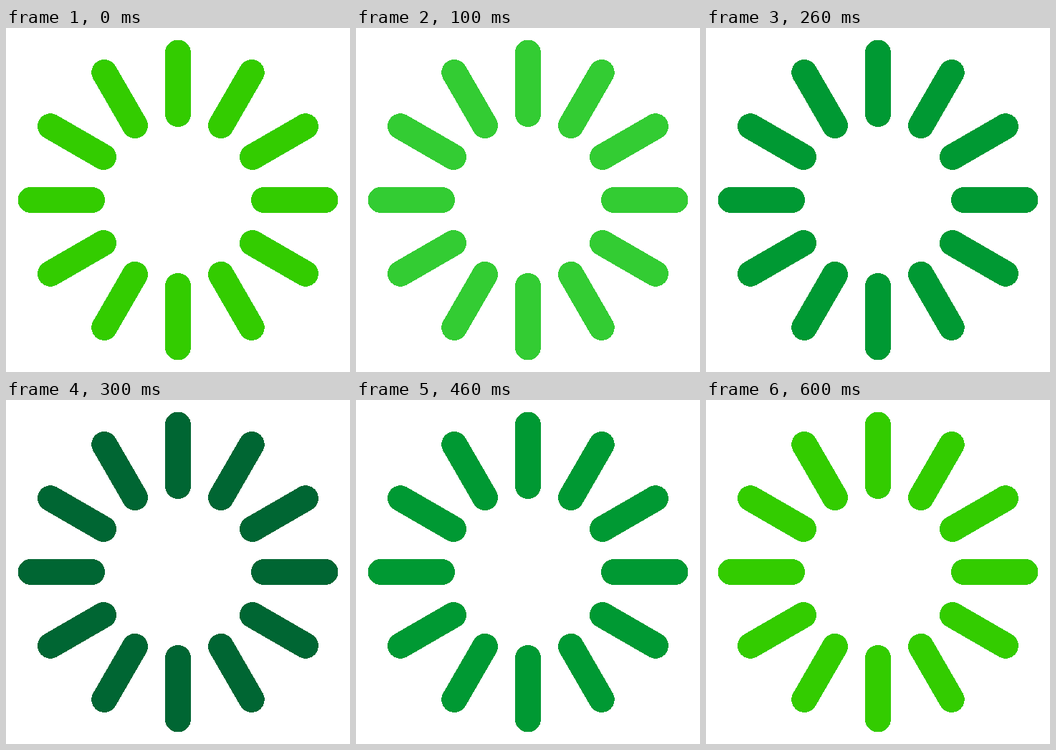
Write an HTML page that moves like this. It is 480 px wide and 480 px high and loops after 0.7 s.

```html
<!DOCTYPE html>
<html lang="en">
<head>
<meta charset="utf-8">
<title>Pulsing spinner</title>
<style>
  html, body { margin: 0; width: 100%; height: 100%; overflow: hidden; background: #fff; }
  svg { display: block; width: 100%; height: 100%; }
</style>
</head>
<body>
<svg viewBox="0 0 480 480">
  <g id="spokes" transform="translate(240 240)" stroke="#33cc00" stroke-width="36"
     stroke-linecap="round" shape-rendering="crispEdges"></g>
</svg>
<script>
  const SPOKES = 12, INNER = 120, OUTER = 205.5;
  const STEP = 100;
  const COLORS = ['#33cc00', '#33cc33', '#009933', '#006633', '#009933', '#33cc33', '#33cc00'];
  const spokes = document.getElementById('spokes');

  for (let i = 0; i < SPOKES; i++) {
    const line = document.createElementNS('http://www.w3.org/2000/svg', 'line');
    const angle = i * 2 * Math.PI / SPOKES;
    const x = Math.sin(angle), y = -Math.cos(angle);
    const ends = { x1: x * INNER, y1: y * INNER, x2: x * OUTER, y2: y * OUTER };
    for (const [name, value] of Object.entries(ends)) line.setAttribute(name, value.toFixed(3));
    spokes.appendChild(line);
  }

  function render(time) {
    spokes.setAttribute('stroke', COLORS[Math.floor(time / STEP) % COLORS.length]);
  }

  const start = performance.now();
  function tick() {
    render(performance.now() - start);
    requestAnimationFrame(tick);
  }
  tick();
</script>
</body>
</html>
```
